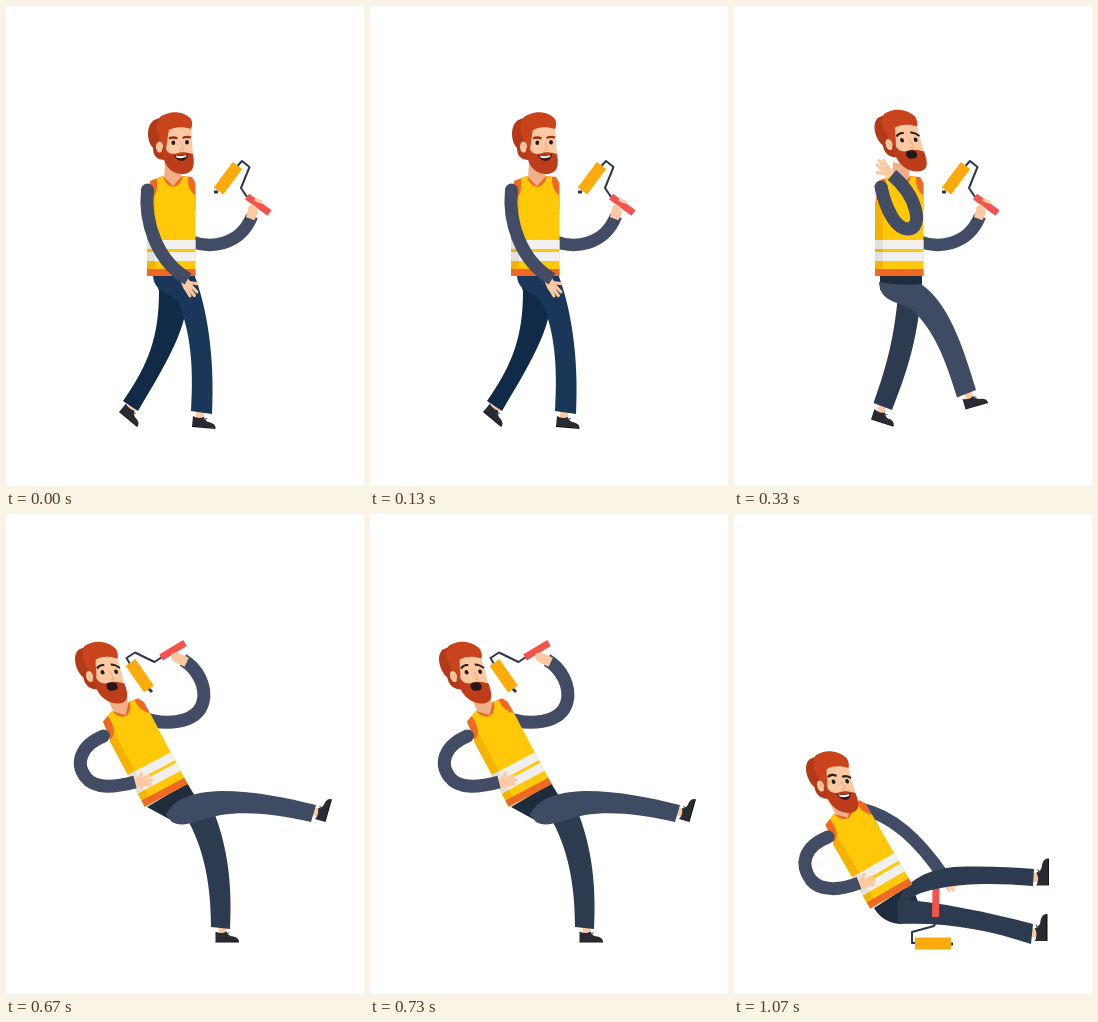
An HTML page with a canvas that plays this animation: 358 by 480 pixels, repeating every 1.34 s.

```html
<!DOCTYPE html>
<html lang="en">
<head>
<meta charset="utf-8">
<title>Slipping painter</title>
<style>
html, body { margin: 0; width: 100%; height: 100%; overflow: hidden; background: #fff; }
canvas { display: block; width: 100vw; height: 100vh; }
</style>
</head>
<body>
<canvas id="stage"></canvas>
<script>
const W = 358, H = 480, LOOP = 1340;
const canvas = document.getElementById('stage');
const ctx = canvas.getContext('2d');

const C = {
  skin: '#fcc9a2', shade: '#efb088', hair: '#c9441c', hairBack: '#b23a19', beard: '#bd3d1a',
  yellow: '#ffc808', amber: '#f5b301', orange: '#ee6a24', white: '#f1f0ee',
  sleeve: '#424d65', leg: '#3e4b62', legBack: '#2c3b50', hip: '#1e2c3e',
  navy: '#1a3658', navyBack: '#102a47', shoe: '#292b32', wire: '#2b3850', red: '#f4534c', roller: '#fcab0c'
};

function fill(d, color) {
  ctx.fillStyle = color;
  ctx.fill(new Path2D(d));
}

function line(d, color, width, cap = 'butt') {
  ctx.strokeStyle = color;
  ctx.lineWidth = width;
  ctx.lineCap = cap;
  ctx.lineJoin = 'round';
  ctx.stroke(new Path2D(d));
}

function oval(x, y, rx, ry, color) {
  ctx.fillStyle = color;
  ctx.beginPath();
  ctx.ellipse(x, y, rx, ry, 0, 0, Math.PI * 2);
  ctx.fill();
}

function at(x, y, deg, draw) {
  ctx.save();
  ctx.translate(x, y);
  ctx.rotate(deg * Math.PI / 180);
  draw();
  ctx.restore();
}

function arm(x, y, curve) {
  oval(x, y, 6.5, 6.5, C.sleeve);
  line(`M${x},${y} ${curve}`, C.sleeve, 13);
}

// Wrist at the origin, fingers along +x
function hand(x, y, deg) {
  at(x, y, deg, () => {
    fill('M-4,-4 L4,-5 Q9,-4 9,0 Q9,5 4,5 L-4,4 Z', C.skin);
    line('M5,-3 L13,-5 M6,0 L15,-1 M6,3 L13,3', C.skin, 3.2, 'round');
    line('M2,-4 L6,-9', C.skin, 3.2, 'round');
  });
}

// Heel at the origin, toe along +x
function shoe(x, y, deg, size = 1) {
  at(x, y, deg, () => {
    ctx.scale(size, size);
    fill('M3,-17 L11,-17 L11,-8 L3,-8 Z', C.skin);
    fill('M0,-11 Q6,-8 11,-11 Q13,-6 18,-6 Q23,-5 23.5,-1 L0,-1 Z', C.shoe);
    line('M0,-.7 L23.5,-.7', '#15171d', 1.4);
    line('M11,-8 L14,-10', '#4b4d55', 1);
  });
}

function tool(wire, roller, tip, handle) {
  line(wire, C.wire, 2);
  line(tip, C.wire, 3);
  line(roller, C.roller, 11.8);
  line(handle, C.red, 7);
}

// A lean pushes the chin forward while the features stay level
function head(x, y, lean, mood) {
  at(x, y, 0, () => {
    ctx.transform(1, 0, lean, 1, 0, 0);
    ctx.translate(-165, -138);
    fill('M159,154 C151,154 147,150 147,142 C141,136 140,122 146,116 C149,112 153,114 155,110 L164,112 L164,154 Z', C.hairBack);
    fill('M157,122 Q172,119 185,121 L187,150 Q172,162 158,152 Z', C.skin);
    fill('M152,129 C148,120 152,110 160,108 C169,104 180,107 185,113 C187,117 186,121 185,123 C177,120 168,121 163,124 C161,131 162,138 159,145 L155,140 Z', C.hair);
    oval(153.5, 141, 3.5, 5.5, C.skin);
    line('M152.5,139 Q155,140 154,143', C.shade, 1);
    fill('M156,143 L159,140 C161,149 167,149 174,146.5 C180,145.5 184,147 187,148 C189,160 188,168 175,168 C163,167 157,158 156,143 Z', C.beard);
    line('M175,136 L177.5,143.5 L174,144', C.shade, 1.3);
    oval(167.3, 136.8, 1.9, 2.2, '#241d20');
    oval(181, 136.2, 1.9, 2.2, '#241d20');
    if (mood === 'calm') {
      line('M163,132.5 Q167,130.5 171.5,132.5 M176.5,132 Q181,130 185,131.5', '#9d301a', 2.4);
    } else if (mood === 'scared') {
      line('M162.5,133 Q166,129 170.5,129.5 M177,129 Q182,129 185.5,132.5', '#30201f', 2.1);
    } else {
      line('M162.5,132 Q167,128 171.5,131 M177,132 Q181,130 185.5,133', '#30201f', 2.3);
    }
    if (mood === 'scared') {
      fill('M168.5,151 Q168.5,147 173,147 Q179.5,146 179.5,151 Q179.5,155 174,155 Q168.5,156 168.5,151 Z', '#24181b');
    } else {
      fill('M168,149 Q175,151 182,148 Q181,155 175,155 Q170,154 168,149 Z', '#33171a');
      fill('M169.5,149.5 Q175,151 180.5,149 L180,151 Q175,153 170.5,151.5 Z', '#fff');
    }
  });
}

// Origin is the middle of the hem
function torso(x, y, deg) {
  at(x, y, deg, () => {
    ctx.translate(-165, -270);
    fill('M159,156 L176,160 L175,175 L166,180 L158,173 Z', C.shade);
    fill('M144,175 L157,170 L167,180 L176,170 L186,171 L189.5,177 L189.5,204 L141,204 Z', C.orange);
    fill('M151,172 L157,170 Q160,181 168,181 Q175,179 177,170 L182,171 Q181,183 189.5,190 L189.5,270 L141,270 L141,195 Q153,193 151,172 Z', C.yellow);
    fill('M141,195 Q146,194 149,190 L149,270 L141,270 Z', C.amber);
    fill('M141,234 H189.5 V243 H141 Z M141,246 H189.5 V255 H141 Z', C.white);
    fill('M141,234 H149 V243 H141 Z M141,246 H149 V255 H141 Z', '#e2e0dd');
    fill('M141,263 H189.5 V270 H141 Z', C.orange);
  });
}

function raisedRoller() {
  line('M184,235 C204,243 234,240 246,210', C.sleeve, 12.5);
  tool('M241,191 L235,182 L243.5,161 L236,155 L231.5,160', 'M231.5,159.5 L212.5,185', 'M212,186 L208,186', 'M241,190.5 L263.5,207');
  at(246, 209, -70, () => fill('M-4,-5 L7,-6 Q12,-4 9,1 L4,5 L-4,4 Z', C.skin));
  line('M250,194 L255,196', C.skin, 3.2, 'round');
}

function walk() {
  shoe(113, 406, 40);
  shoe(186, 421, 5);
  fill('M148,270 L181,280 C184,315 168,345 132,405 L117,395 C143,358 153,330 153,285 Z', C.navyBack);
  fill('M147,268 L188,268 C201,302 209,350 206,408 L185,405 C188,358 184,326 173,298 C163,284 147,287 147,268 Z', C.navy);
  raisedRoller();
  torso(165, 270, 0);
  head(165, 138, 0, 'calm');
  hand(180, 277, 60);
  arm(141.5, 184, 'C138,216 151,255 182,273');
}

function slip() {
  shoe(137, 413.5, 18);
  shoe(231.5, 403.5, -16);
  fill('M164,290 L186,300 C181,340 173,366 158,404 L139.5,397 C154,357 160,330 164,290 Z', C.legBack);
  fill('M146,266 H188 V284 H146 Z', C.hip);
  fill('M145,276 Q166,280 187,278 C214,296 229,340 242,384 L223,391.5 C212,355 200,323 177,303 C163,295 146,296 145,276 Z', C.leg);
  raisedRoller();
  torso(165, 270, 0);
  head(166, 135.5, .2, 'scared');
  hand(154, 167, -122);
  arm(147, 181, 'C152,204 162,223 174,223 C190,222 183,190 158,169');
}

function fall() {
  shoe(209.5, 428.5, 0);
  shoe(319.5, 308, -74);
  line('M132,202 C158,213 191,210 197,188 C201,172 191,154 177,146', C.sleeve, 13);
  tool('M156,143 L148.5,148 L129,138.5 L120.5,144 L124,150', 'M124.5,148.5 L143,175', 'M142,174 L146,178', 'M155,143.5 L179,129');
  at(178, 147, -155, () => fill('M-3,-5 L8,-5 Q15,-4 14,2 L10,5 L-3,5 Z', C.skin));
  fill('M180,303 L207,296 C219,325 227,363 224,415 L205,413 C205,370 198,334 180,303 Z', C.legBack);
  fill('M141,293 L181,269 L192,287 L180,308 L163,305 Z', C.hip);
  fill('M160,301 C167,286 184,278 215,277 C250,277 281,284 310,291 L305,308 C270,300 240,297 215,301 C195,305 177,315 166,308 Z', C.leg);
  torso(160, 281.5, -28);
  head(94.5, 159.5, .2, 'scared');
  hand(131, 269, -8);
  arm(97.5, 222, 'C73.5,232 69.5,250 79.5,263 C89,276 110,273 129,268');
}

function sit() {
  shoe(315, 371.5, -90, 1.15);
  shoe(313.5, 427, -90, 1.15);
  line('M128,295 C160,302 186,327 210,363', C.sleeve, 12.5);
  hand(210, 364, 55);
  fill('M140,394 L177,370 L185,390 L165,410 Q148,408 140,394 Z', C.hip);
  fill('M164,385 C205,388 253,398 299,410 L297,430 C253,415 210,408 165,410 Z', C.legBack);
  tool('M202,408 L200,412 L178,418 L178,429 L183,429', 'M181,429.5 L217,429.5', 'M216,430 L219,430', 'M201.5,403 L202,374');
  fill('M163,391 C169,370 188,356 220,353 C250,352 277,353 300,355 L299,372 C265,369 232,369 207,374 C190,377 179,381 172,388 L164,410 Z', C.legBack);
  torso(157, 382.5, -30);
  head(97.5, 269, .2, 'happy');
  hand(126, 370, -10);
  arm(94, 323, 'C69,333 66,351 77,366 C87,378 107,376 125,369');
}

const scenes = [[1000, sit], [670, fall], [330, slip], [0, walk]];

function frame(now) {
  const dpr = window.devicePixelRatio || 1;
  const w = Math.round(innerWidth * dpr), h = Math.round(innerHeight * dpr);
  if (canvas.width !== w || canvas.height !== h) {
    canvas.width = w;
    canvas.height = h;
  }
  ctx.setTransform(w / W, 0, 0, h / H, 0, 0);
  ctx.fillStyle = '#fff';
  ctx.fillRect(0, 0, W, H);
  const t = Math.max(0, now) % LOOP;
  scenes.find(([start]) => t >= start)[1]();
  requestAnimationFrame(frame);
}
frame(performance.now());
</script>
</body>
</html>
```
